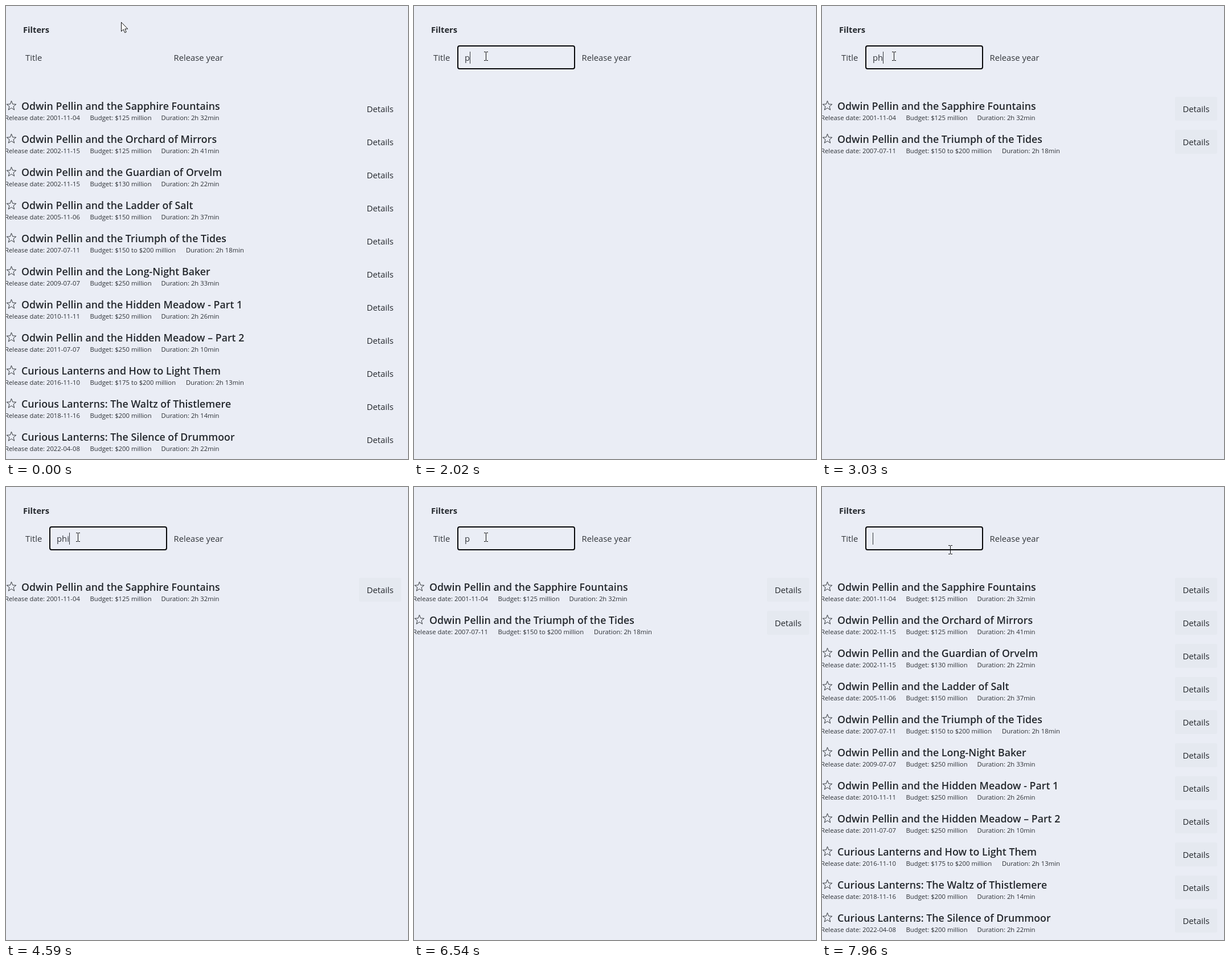
Recreate the animation shown at these times as an HTML page with a canvas. Size 706x794 px, loop 8 s.

```html
<!DOCTYPE html>
<html lang="en">
<head>
<meta charset="utf-8">
<title>Film filter</title>
<style>
  html, body { margin: 0; width: 100%; height: 100%; overflow: hidden; background: #eaedf5; }
  canvas { display: block; width: 706px; height: 794px; }
</style>
</head>
<body>
<canvas id="stage"></canvas>
<script>
const W = 706, H = 794, LOOP = 8000;
const FONT = '"Open Sans", "Noto Sans", sans-serif';
const BG = '#eaedf5', TINT = '#e5e9f0', INK = '#24282d';

const canvas = document.getElementById('stage');
const ctx = canvas.getContext('2d');
const dpr = window.devicePixelRatio || 1;
canvas.width = W * dpr;
canvas.height = H * dpr;

const films = [
  ["Odwin Pellin and the Sapphire Fountains", '2001-11-04', '$125 million', '2h 32min'],
  ["Odwin Pellin and the Orchard of Mirrors", '2002-11-15', '$125 million', '2h 41min'],
  ["Odwin Pellin and the Guardian of Orvelm", '2002-11-15', '$130 million', '2h 22min'],
  ["Odwin Pellin and the Ladder of Salt", '2005-11-06', '$150 million', '2h 37min'],
  ["Odwin Pellin and the Triumph of the Tides", '2007-07-11', '$150 to $200 million', '2h 18min'],
  ["Odwin Pellin and the Long-Night Baker", '2009-07-07', '$250 million', '2h 33min'],
  ["Odwin Pellin and the Hidden Meadow - Part 1", '2010-11-11', '$250 million', '2h 26min'],
  ["Odwin Pellin and the Hidden Meadow \u2013 Part 2", '2011-07-07', '$250 million', '2h 10min'],
  ["Curious Lanterns and How to Light Them", '2016-11-10', '$175 to $200 million', '2h 13min'],
  ["Curious Lanterns: The Waltz of Thistlemere", '2018-11-16', '$200 million', '2h 14min'],
  ["Curious Lanterns: The Silence of Drummoor", '2022-04-08', '$200 million', '2h 22min']
].map(([title, date, budget, duration]) => ({ title, date, budget, duration }));

// Each track holds [start time, value] pairs; values change abruptly.
const typed = [[0, ''], [2020, 'p'], [3030, 'ph'], [4590, 'phi'], [5540, 'ph'], [6540, 'p'], [7160, '']];
const query = [[0, ''], [2020, null], [2090, 'p'], [3030, 'ph'], [4590, 'phi'], [5540, 'ph'], [6620, 'p'], [7160, '']];
const caret = [[0, 0], [540, 1], [1070, 0], [1640, 1], [2570, 0], [3030, 1], [3520, 0], [4070, 1],
  [5060, 0], [5630, 1], [6160, 0], [6700, 1], [7160, 0], [7720, 1]];
const field = [[0, 'idle'], [220, 'hover'], [540, 'focusing'], [610, 'focus']];
const pointer = [
  [0, [arrow, 202, 28]], [60, [arrow, 147, 25]], [140, [arrow, 138, 41]],
  [220, [beam, 130, 84]], [300, [beam, 126, 88]],
  [7890, [beam, 171, 97]], [7960, [beam, 225, 110]]
];

function at(track, t) {
  let value = track[0][1];
  for (const [start, v] of track) if (t >= start) value = v;
  return value;
}

function text(str, x, y, size, weight = 400, color = INK) {
  ctx.font = `${weight} ${size}px ${FONT}`;
  ctx.fillStyle = color;
  ctx.fillText(str, x, y);
}

function box(x, y, w, h, r) {
  ctx.beginPath();
  ctx.roundRect(x, y, w, h, r);
}

function star(cx, cy) {
  ctx.beginPath();
  for (let i = 0; i < 10; i++) {
    const r = i % 2 ? 3.7 : 8.8;
    const a = i * Math.PI / 5 - Math.PI / 2;
    ctx.lineTo(cx + r * Math.cos(a), cy + r * Math.sin(a));
  }
  ctx.closePath();
  ctx.strokeStyle = '#34383d';
  ctx.lineWidth = 1;
  ctx.stroke();
}

function row(film, y, tinted) {
  star(9.5, y + 16);
  text(film.title, 27, y + 23, 17.8, 600);
  const small = (str, x) => text(str, x, y + 41, 11.3, 400, '#2d3136');
  small('Release date: ' + film.date, -2);
  small('Budget: ' + film.budget, 147.5);
  small('Duration: ' + film.duration, film.budget.length > 12 ? 316 : 272.5);
  if (tinted) {
    box(620, y, 74, 42, 3);
    ctx.fillStyle = TINT;
    ctx.fill();
  }
  text('Details', 633.5, y + 27, 14.8);
}

function input(t) {
  const state = at(field, t);
  if (state === 'hover') {
    box(76, 69, 207, 42, 4);
    ctx.fillStyle = TINT;
    ctx.fill();
  } else if (state !== 'idle') {
    box(77, 70, 205, 40, 3);
    ctx.strokeStyle = state === 'focus' ? '#08090b' : '#777b82';
    ctx.lineWidth = 2;
    ctx.stroke();
  }
  const value = at(typed, t);
  text(value, 89, 96, 14.8, 400, '#33373c');
  if (at(caret, t)) ctx.fillRect(89 + Math.round(ctx.measureText(value).width), 80, 1, 21);
}

function arrow(x, y) {
  const pts = [[0, 0], [0, 16], [3.7, 12.6], [6.2, 18.2], [8.7, 17.1], [6.3, 11.6], [11.3, 11.6]];
  ctx.beginPath();
  for (const [dx, dy] of pts) ctx.lineTo(x + dx + 0.5, y + dy + 0.5);
  ctx.closePath();
  ctx.fillStyle = '#fff';
  ctx.fill();
  ctx.strokeStyle = '#111';
  ctx.lineWidth = 1;
  ctx.stroke();
}

function beam(x, y) {
  ctx.fillStyle = '#111';
  ctx.fillRect(x, y - 7, 1, 14);
  for (const edge of [y - 8, y + 7]) {
    ctx.fillRect(x - 3, edge, 3, 1);
    ctx.fillRect(x + 1, edge, 3, 1);
  }
}

function draw(t) {
  ctx.setTransform(dpr, 0, 0, dpr, 0, 0);
  ctx.fillStyle = BG;
  ctx.fillRect(0, 0, W, H);

  text('Filters', 30, 47, 14.7, 700);
  text('Title', 34, 96, 14.8, 400, '#33373c');
  text('Release year', 294.5, 96, 14.8, 400, '#33373c');
  input(t);

  const q = at(query, t);
  const shown = q === null ? [] : films.filter(f => f.title.toLowerCase().includes(q));
  shown.forEach((film, i) => row(film, 159 + i * 58, t >= 2020));

  const [shape, x, y] = at(pointer, t);
  shape(x, y);
}

function tick() {
  draw(performance.now() % LOOP);
  requestAnimationFrame(tick);
}
tick();
</script>
</body>
</html>
```
